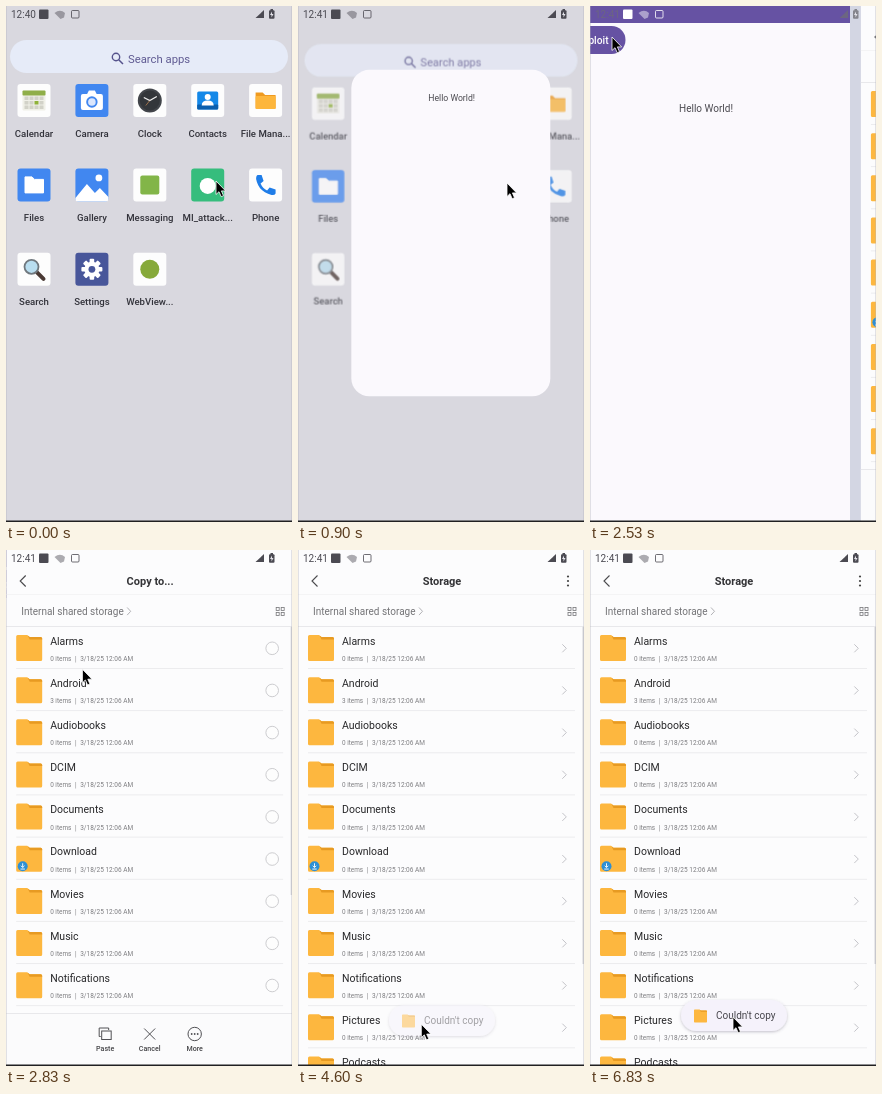
Recreate the animation shown at these times as an HTML page. Size 286 px wide and 516 px high, loop 6.86 s.

```html
<!DOCTYPE html>
<html lang="en">
<head>
<meta charset="utf-8">
<title>Copy demo</title>
<style>
html, body { margin: 0; width: 100%; height: 100%; overflow: hidden; background: #d9d8df; }
svg { display: block; width: 286px; height: 516px; }
text { font-family: Roboto, "Noto Sans", sans-serif; }
</style>
</head>
<body>
<svg id="stage" viewBox="0 0 286 516"></svg>
<script>
const LOOP = 6860;
const stage = document.getElementById('stage');

// ---- markup helpers ----
const rect = (x, y, w, h, fill, rx = 0, extra = '') =>
  `<rect x="${x}" y="${y}" width="${w}" height="${h}" rx="${rx}" fill="${fill}" ${extra}/>`;
const circle = (x, y, r, fill, extra = '') => `<circle cx="${x}" cy="${y}" r="${r}" fill="${fill}" ${extra}/>`;
const path = (d, fill, extra = '') => `<path d="${d}" fill="${fill}" ${extra}/>`;
const line = (d, color, width = 1, extra = '') =>
  path(d, 'none', `stroke="${color}" stroke-width="${width}" ${extra}`);
const text = (x, y, size, fill, label, extra = '') =>
  `<text x="${x}" y="${y}" font-size="${size}" fill="${fill}" ${extra}>${label}</text>`;
const group = (id, body, extra = '') => `<g id="${id}" ${extra}>${body}</g>`;
const at = (x, y, body) => `<g transform="translate(${x} ${y})">${body}</g>`;
const MID = 'text-anchor="middle"', MEDIUM = 'font-weight="500"';

// ---- launcher ----
const tile = fill => rect(-16.5, -16.5, 33, 33, fill, 3);
const gear = () => {
  let teeth = '';
  for (let a = 0; a < 360; a += 45) teeth += rect(-2.3, -10.5, 4.6, 6, '#fff', 1, `transform="rotate(${a})"`);
  return teeth + circle(0, 0, 7.6, '#fff') + circle(0, 0, 3.4, '#48569a');
};
const calendar = () => {
  let cells = '';
  for (let i = 0; i < 12; i++)
    cells += rect(-9.5 + i % 4 * 5, -4 + Math.floor(i / 4) * 4.5, 4, 3.5, i === 6 ? '#8fb23a' : '#d2d2c8');
  return rect(-11.5, -10, 23, 20, '#f0f0e8', 1) + rect(-11.5, -10, 23, 5, '#8fae48', 1) + cells;
};
const smallFolder = (fill, dark) =>
  path('M-10 -8 h7 l2.5 2.5 h10.5 v13.5 h-20z', dark) + rect(-10, -4.5, 20, 13, fill, 1);
const apps = [
  ['Calendar', '#fdfdfd', calendar()],
  ['Camera', '#4187f0', rect(-11, -6.5, 22, 16, '#fff', 2) + path('M-5 -6 l2-4 h6 l2 4z', '#fff') +
    circle(0, 1.5, 5.7, '#4187f0') + circle(0, 1.5, 3.8, '#dbe7fd')],
  ['Clock', '#fdfdfd', circle(0, 0, 12, '#42454a') + circle(0, 0, 10, '#33363a') +
    line('M-6 -3 L0 0 L7 -4', '#eee', 1.3) + line('M0 0 L-4 5', '#c98a55', .7)],
  ['Contacts', '#fdfdfd', rect(-10.5, -9, 21, 18, '#1488e8', 1.5) + rect(-10.5, 4, 21, 5, '#0b5fae', 1) +
    circle(0, -3.5, 3, '#fff') + path('M-6 5 q0-5 6-5 t6 5z', '#fff')],
  ['File Mana...', '#fdfdfd', smallFolder('#fdb63c', '#ef9a20')],
  ['Files', '#4187f0', path('M-9-8 h7 l2.5 2.5 h9 v13.5 h-18.5z', '#fff', 'stroke="#fff" stroke-linejoin="round"')],
  ['Gallery', '#4187f0', path('M-16.5 13 L-5-1 L3 8 L8 3 L16.5 12 V14 a2.5 2.5 0 0 1-2.5 2.5 H-14 a2.5 2.5 0 0 1-2.5-2.5z', '#fff') +
    circle(7, -7, 3.4, '#fff')],
  ['Messaging', '#fdfdfd', rect(-9.5, -9.5, 19, 19, '#82b548', 2)],
  ['MI_attack...', '#36bd7d', circle(0, 1, 8, '#fff')],
  ['Phone', '#fdfdfd', path('M-8-10 h4 l2 6 l-3 2.5 q2 5 6.5 7 l2.5-3 l6 2 v4 q-1 2-4 1.5 q-13-3-15.5-16 q0-3.5 1.500-4z', '#1f7de8')],
  ['Search', '#fdfdfd', line('M3 3 L9.500 9.500', '#4a3a35', 4, 'stroke-linecap="round"') +
    circle(-2.5, -2.500, 7, '#b9def0', 'stroke="#70787e" stroke-width="1.8"')],
  ['Settings', '#48569a', gear()],
  ['WebView...', '#fdfdfd', circle(0, 0, 9.5, '#86a93a')],
];
const launcherIcons = apps.map(([label, fill, art], i) =>
  at(28 + i % 5 * 57.9, 94.5 + Math.floor(i / 5) * 84.4,
    tile(fill) + art + text(0, 36, 9.6, '#33333b', label, `${MID} ${MEDIUM}`))).join('');
const home = rect(4, 34, 278, 33, '#e6ebf8', 16.5) +
  circle(110, 51, 3.7, 'none', 'stroke="#55528c" stroke-width="1.4"') + line('M112.7 53.700 L117 58', '#55528c', 1.5) +
  text(122, 56.5, 11.3, '#5f5a92', 'Search apps') + launcherIcons;

// ---- app with the button ----
const demoApp = rect(0, 0, 288, 516, '#fbf9fd') + rect(0, 0, 288, 17, '#6652a3') +
  rect(-2, 20, 65.5, 28, '#6652a3', 14) +
  text(15.5, 37.7, 10.2, '#fff', 'Exploit', MEDIUM) +
  text(144, 105.6, 10, '#4b4a50', 'Hello World!', MID);

// ---- file manager ----
const ROW = 42.15;
const names = ['Alarms', 'Android', 'Audiobooks', 'DCIM', 'Documents', 'Download',
  'Movies', 'Music', 'Notifications', 'Pictures', 'Podcasts'];
const folder = path('M0 1.5 q0-1.500 1.500-1.500 h9.500 l2.500 2 h11 q1.500 0 1.500 1.500 v21 q0 1.500-1.500 1.500 h-23 q-1.500 0-1.500-1.500z', '#fdb73f') +
  path('M11.500 0.500 l2 1.500 h11 q1.500 0 1.500 1.500 v1 h-12.500z', '#e79a22');
const badge = circle(6.5, 20.5, 5, '#2c8fd6') + line('M6.5 17.5 v4 M4.700 20 l1.800 1.800 l1.800 -1.800 M4.300 23.300 h4.400', '#fff', .9);
const rows = names.map((name, i) => at(0, i * ROW,
  at(10, 85, folder + (name === 'Download' ? badge : '')) +
  text(44, 94.700, 10.5, '#28282a', name) +
  text(44, 111, 6.4, '#7d7d80', `${name === 'Android' ? 3 : 0} items`) +
  text(69.5, 111, 6.5, '#7d7d80', '|', MID) +
  text(74, 111, 6.5, '#7d7d80', '3/18/25 12:06 AM') +
  line('M10 118.500 H277', '#ececee'))).join('');
const column = draw => names.map((_, i) => draw(98.3 + i * ROW)).join('');
const grid = [0, 5].map(x => [0, 5].map(y =>
  rect(270 + x, 57.5 + y, 3, 3, 'none', 0, 'stroke="#77777a" stroke-width=".8"')).join('')).join('');
const title = label => text(144, 35.2, 11, '#333336', label, `${MID} font-weight="600"`);
const tool = (x, label, art) => at(x, 484, art) + text(x, 500.8, 7.1, '#454548', label, `${MID} ${MEDIUM}`);
const THIN = 'stroke="#505054" stroke-width="1"';
const toolbar = rect(0, 463, 286, 53, '#fbfbfc') + line('M0 463.500 H286', '#e8e8eb') +
  tool(99, 'Paste', line('M-4.500 2.500 H-6 V-6 H3.500 V-4', '#505054') + rect(-3.5, -3, 9.5, 8.5, 'none', 0, THIN)) +
  tool(143.5, 'Cancel', line('M-5.500 -5.500 L5.500 5.500 M5.500 -5.500 L-5.500 5.500', '#505054')) +
  tool(188.5, 'More', circle(0, 0, 6.7, 'none', THIN) + [-3, 0, 3].map(x => circle(x, 0, .9, '#505054')).join(''));
const copyView = title('Copy to...') + rect(284.500, 77, 1.500, 268, '#d3d3d8') +
  column(y => circle(266, y, 6.3, '#fdfdfd', 'stroke="#cdcdd0"'));
const storageView = title('Storage') + rect(284.500, 77, 1.500, 337, '#d3d3d8') +
  [26.500, 31, 35.500].map(y => circle(270, y, 1.1, '#444')).join('') +
  column(y => line(`M264.300 ${y - 4} l4 4 l-4 4`, '#bdbdc2', .9));
const files = rect(0, 0, 286, 516, '#fcfcfd') + rows +
  line('M0 44.500 H286', '#f4f4f5') + line('M0 76.500 H286', '#e8e8eb') +
  line('M19.500 25.500 L14 31 L19.500 36.500', '#4a4a4d', 1.100) +
  text(15, 65, 10, '#747477', 'Internal shared storage') +
  line('M121 57.500 l3.500 3.800 l-3.500 3.800', '#aaaaae', .9) + grid +
  group('copy', copyView) + group('storage', storageView) + group('toolbar', toolbar);
const toast = rect(91, 450, 106, 31, '#f5f2fb', 15.5, 'filter="url(#soft)"') +
  `<g transform="translate(104 459.500) scale(.5)">${folder}</g>` +
  text(126, 469.300, 10, '#47464c', "Couldn't copy");

// ---- system overlays ----
const status = group('clock', `<text id="time" x="5" y="12" font-size="10"></text>` +
    path('M258 4 V12 H249.500z', 'currentColor')) +
  group('notes', rect(33, 3.500, 9.500, 9.500, 'currentColor', 1) +
    `<g opacity=".45">` + path('M48.500 7 q5.500 -4.500 10.500 0 l-1 4.500 l-3.500 1.500z', 'currentColor') + '</g>' +
    rect(65.500, 4.500, 7.500, 7.500, 'none', 1, 'stroke="currentColor" stroke-width="1" opacity=".8"')) +
  group('battery', rect(263, 4.300, 5.500, 8.500, 'currentColor', 1) + rect(264.500, 3, 2.500, 2, 'currentColor') +
    `<path id="bolt" d="M266 5.500 l-2 3.500 h1.500 v2.500 l2 -3.500 h-1.500z"/>`);
const arrow = path('M0 0 V13.500 L3 10.700 L5.200 15.700 L7.500 14.700 L5.400 9.900 H9.600z', '#000',
  'stroke="#fff" stroke-width=".8" stroke-linejoin="round"');

stage.innerHTML = `<defs><clipPath id="card"><rect id="hole"/></clipPath>
  <filter id="soft" x="-20%" y="-40%" width="140%" height="190%">
  <feDropShadow dx="0" dy="1" stdDeviation="1.6" flood-color="#55506a" flood-opacity=".35"/></filter></defs>` +
  rect(0, 0, 286, 516, '#d9d8df', 0, 'id="back"') + group('home', home) +
  group('appWindow', group('app', demoApp), 'clip-path="url(#card)"') +
  group('files', files) + group('status', status) + group('toast', toast) +
  line('M.25 0 V516 M285.750 0 V516', '#b5b4bd', .5) + rect(0, 514.500, 286, 1.500, '#202022') +
  group('cursor', arrow);

// ---- motion ----
const el = id => document.getElementById(id);
const set = (id, attrs) => { for (const k in attrs) el(id).setAttribute(k, attrs[k]); };
const show = (id, on) => { el(id).style.display = on ? '' : 'none'; };
const span = (t, from, to) => Math.min(1, Math.max(0, (t - from) / (to - from)));
const mix = (a, b, u) => a + (b - a) * u;
const out = u => 1 - (1 - u) ** 3;
const gray = (a, b, u) => `rgb(${a.map((v, i) => Math.round(mix(v, b[i], u)))})`;

const DARK = [75, 74, 82], WHITE = [255, 255, 255];
const cursorStops = [
  [0, 210, 175], [250, 209, 177], [1300, 209, 177], [1430, 155, 134], [1650, 60, 59], [1850, 22, 31],
  [2620, 22, 31], [3000, 120, 190], [3500, 225, 370], [3770, 159, 430], [4080, 99, 483],
  [4380, 99, 483], [4780, 143, 467], [LOOP, 143, 467],
];
function cursorAt(t) {
  const i = cursorStops.findIndex(stop => stop[0] > t);
  const [t0, x0, y0] = cursorStops[i - 1], [t1, x1, y1] = cursorStops[i];
  const u = span(t, t0, t1);
  return [mix(x0, x1, u), mix(y0, y1, u)];
}

function render(t) {
  const open = out(span(t, 799, 1179));
  const leave = out(span(t, 2300, 2510));
  const slide = out(span(t, 2525, 2860));

  show('home', open < 1);
  set('home', {
    opacity: 1 - .45 * open,
    transform: `translate(143 258) scale(${1 - .03 * open}) translate(-143 -258)`,
  });
  set('back', { fill: t > 2200 ? '#d3d6e3' : '#d9d8df' });

  show('appWindow', open > 0 && slide < 1);
  const w = mix(31, 286, open ** .84), h = mix(32, 516, open), cx = mix(201.5, 143, open ** .37);
  const zoom = mix(.66, 1, open);
  set('hole', { x: cx - w / 2, y: mix(163, 0, open), width: w, height: h, rx: 18 * Math.min(1, (1 - open) * 6) });
  set('app', {
    transform: `translate(${cx - 143 * zoom - 28 * leave} ${9 * (1 - open)}) scale(${zoom})`,
  });

  show('files', slide > 0);
  set('files', { transform: `translate(${286 * (1 - slide)} 0)` });
  const pasted = t >= 4400;
  show('copy', !pasted);
  show('storage', pasted);
  set('toolbar', { transform: `translate(0 ${55 * span(t, 4400, 4520)})` });

  const pop = out(span(t, 4560, 4760));
  show('toast', pop > 0);
  set('toast', { opacity: pop, transform: `translate(0 ${10 * (1 - pop)})` });

  const light = span(t, 1050, 1150);
  const fade = span(t, 2480, 2570);
  const tone = u => gray(DARK, WHITE, u);
  const clock = fade > 0 && fade < 1 ? gray([150, 138, 190], DARK, fade) : tone(light * (1 - fade));
  const late = t < 2560 ? tone(light) : tone(0);
  el('clock').style.color = el('time').style.fill = clock;
  el('notes').style.color = late;
  el('battery').style.color = fade > 0 && fade < 1 ? '#85858c' : tone(light * (1 - fade));
  el('bolt').style.fill = light && !fade ? '#6652a3' : '#e4e3ea';
  el('time').textContent = t < 350 ? '12:40' : '12:41';

  const [x, y] = cursorAt(t);
  set('cursor', { transform: `translate(${x} ${y})` });
}

const start = performance.now();
function tick() {
  render((performance.now() - start) % LOOP);
  requestAnimationFrame(tick);
}
tick();
</script>
</body>
</html>
```
